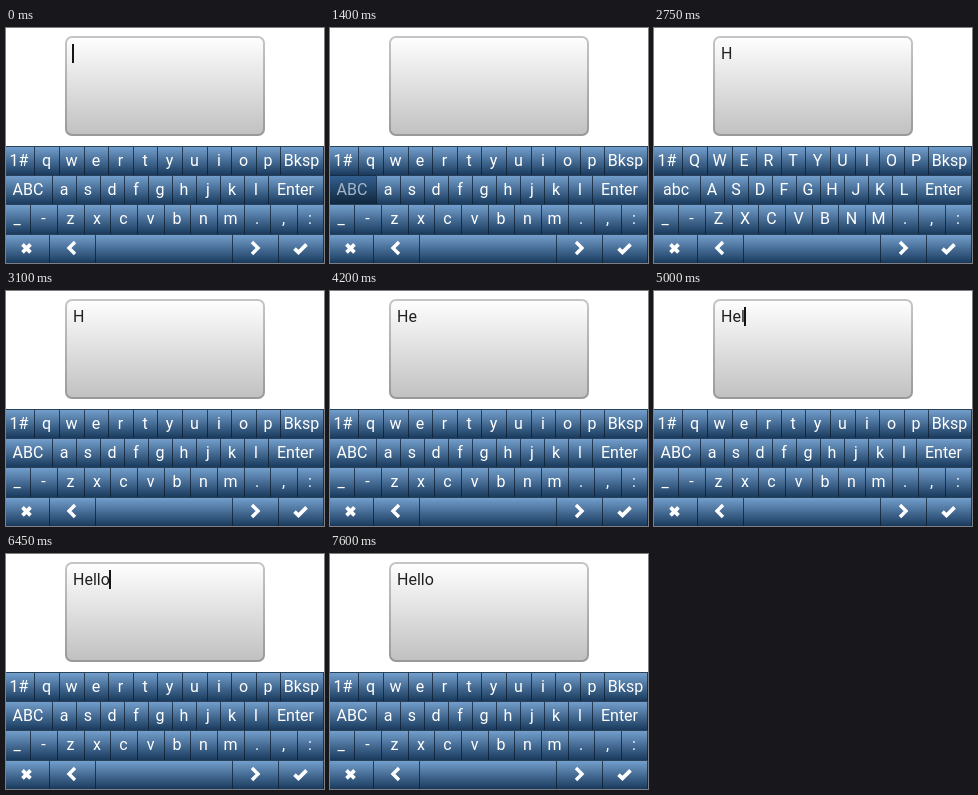
Animation, 318 px wide and 235 px high, one loop 8 s. Source, as an HTML page:

```html
<!DOCTYPE html>
<html>
<head>
<meta charset="utf-8">
<style>
html, body { margin: 0; width: 100%; height: 100%; overflow: hidden; background: #fff; }
svg { display: block; width: 318px; height: 235px; }
text { font: 16px Roboto, sans-serif; }
</style>
</head>
<body>
<svg id="stage" viewBox="0 0 318 235">
  <defs>
    <linearGradient id="paper" x2="0" y2="1"><stop stop-color="#fff"/><stop offset="1" stop-color="#c0c0c0"/></linearGradient>
    <linearGradient id="up" x2="0" y2="1"><stop stop-color="#76a2d0"/><stop offset="1" stop-color="#193a5d"/></linearGradient>
    <linearGradient id="down" x2="0" y2="1"><stop stop-color="#336294"/><stop offset="1" stop-color="#10263c"/></linearGradient>
  </defs>
  <rect x="59" y="8" width="200" height="100" rx="7" fill="url(#paper)"/>
  <rect x="60" y="9" width="198" height="98" rx="6" fill="none" stroke="#404040" stroke-opacity=".3" stroke-width="2"/>
  <text id="typed" x="67" y="31" fill="#202020"></text>
  <rect id="cursor" y="16" width="2" height="19" fill="#141414"/>
  <g id="keys"></g>
</svg>
<script>
const LOOP = 8000, PRESS = 100;
const byId = id => document.getElementById(id);

// Each row: labels and their relative widths.
const rows = [
  { labels: ['1#', ...'qwertyuiop', 'Bksp'], units: [5, ...Array(10).fill(4), 7] },
  { labels: ['ABC', ...'asdfghjkl', 'Enter'], units: [6, ...Array(9).fill(3), 7] },
  { labels: [..._chars('_-zxcvbnm.,:')], units: Array(12).fill(1) },
  { labels: ['close', 'left', '', 'right', 'ok'], units: [2, 2, 6, 2, 2] }
];
const icons = {
  close: ['M-4 -3.6L4 4.4M4 -3.6L-4 4.4', 3.7],
  left: ['M3 -6L-3 0L3 6', 3.4],
  right: ['M-3 -6L3 0L-3 6', 3.4],
  ok: ['M-6 .6L-2 4.4L6 -3.6', 3.7]
};

// Key presses; typed keys add their own label to the field.
const presses = [
  [1400, 'shift'], [2300, 'h'], [3000, 'shift'], [3700, 'e'],
  [4900, 'l'], [5200, 'l'], [6350, 'o']
];
// The cursor starts visible and toggles at each blink; typing shows it again.
const blinks = [250, 650, 1100, 1550, 2000, 2750, 3150, 3600, 4200, 4600, 5650, 6050, 6750, 7200, 7600];
const advance = { H: 11, e: 9, l: 4, o: 9 };

function _chars(s) { return s.split(''); }

function add(parent, tag, attrs) {
  const el = document.createElementNS('http://www.w3.org/2000/svg', tag);
  for (const name in attrs) el.setAttribute(name, attrs[name]);
  return parent.appendChild(el);
}

const keys = [];
rows.forEach(({ labels, units }, r) => {
  const total = units.reduce((a, b) => a + b);
  const top = Math.floor(118 + 29.4 * r);
  const height = Math.floor(118 + 29.4 * (r + 1)) - top;
  let used = 0;
  labels.forEach((label, i) => {
    const edge = n => Math.min(317, Math.floor(320 * n / total) - 2);
    const left = edge(used), right = edge(used += units[i]);
    const center = (left + right) / 2;
    const g = byId('keys');
    const face = add(g, 'rect', { x: left, y: top, width: right - left + 1, height });
    add(g, 'rect', {
      x: left + .5, y: top + .5, width: right - left, height,
      fill: 'none', stroke: '#0b1928', 'stroke-opacity': .7
    });
    if (icons[label]) {
      const [d, width] = icons[label];
      add(g, 'path', {
        d, transform: `translate(${center} ${top + 14})`,
        fill: 'none', stroke: '#fff', 'stroke-width': width
      });
    }
    const text = add(g, 'text', { x: center, y: top + 20, 'text-anchor': 'middle' });
    keys.push({ id: label === 'ABC' ? 'shift' : label, label, face, text });
  });
});

function keyLabel({ id, label }, upper) {
  if (icons[id]) return '';
  if (id === 'shift') return upper ? 'abc' : 'ABC';
  return upper && label.length === 1 ? label.toUpperCase() : label;
}

function draw(t) {
  let upper = false, typed = '', lastTyped = -1, held = null;
  for (const [start, id] of presses) {
    if (t < start) break;
    if (t < start + PRESS) held = id;
    if (id !== 'shift') {
      typed += upper ? id.toUpperCase() : id;
      lastTyped = start;
    } else if (t >= start + PRESS) upper = !upper;
  }
  const toggles = blinks.filter(b => b > lastTyped && b <= t).length;

  byId('typed').textContent = typed;
  byId('cursor').setAttribute('x', [...typed].reduce((x, c) => x + advance[c], 66));
  byId('cursor').setAttribute('visibility', toggles % 2 ? 'hidden' : 'visible');
  for (const key of keys) {
    const down = key.id === held;
    key.face.setAttribute('fill', down ? 'url(#down)' : 'url(#up)');
    key.text.setAttribute('fill', down ? '#a4b5c6' : '#fff');
    key.text.textContent = keyLabel(key, upper);
  }
}

const begin = performance.now();
function tick() {
  draw((performance.now() - begin) % LOOP);
  requestAnimationFrame(tick);
}
tick();
</script>
</body>
</html>
```
